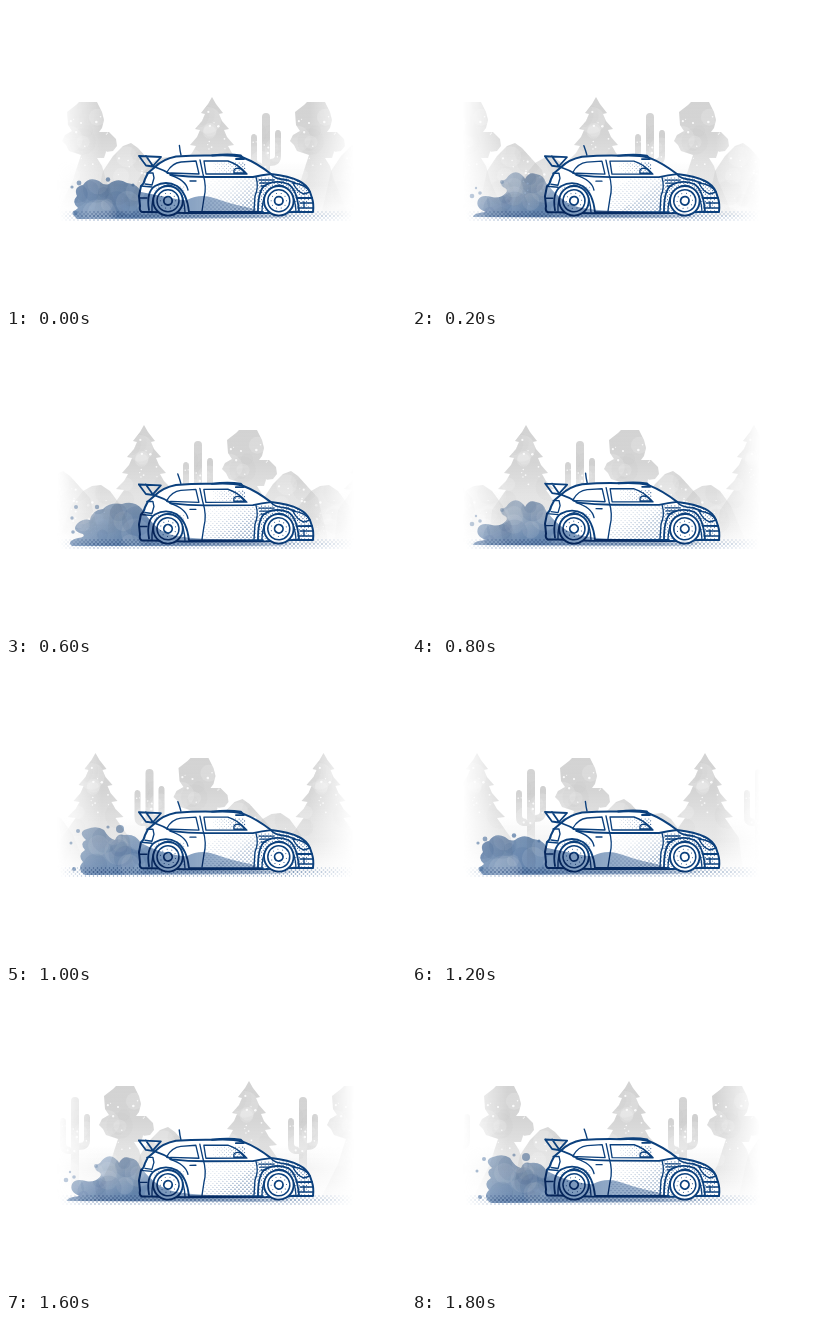
An HTML page with a canvas that plays this animation: 400 px wide and 300 px high, repeating every 1900 ms.

```html
<!DOCTYPE html>
<html lang="en">
<head>
<meta charset="utf-8">
<title>Rally car</title>
<style>
  html, body { margin: 0; width: 100%; height: 100%; overflow: hidden; background: #fff; }
  canvas { display: block; width: 400px; height: 300px; }
</style>
</head>
<body>
<canvas id="stage"></canvas>
<script>
const W = 400, H = 300, LOOP = 1900, STEP = 100, PERIOD = 228;
const INK = '#0b407d';

const dpr = window.devicePixelRatio || 1;

function prepare(canvas) {
  canvas.width = W * dpr;
  canvas.height = H * dpr;
  const c = canvas.getContext('2d');
  c.scale(dpr, dpr);
  return c;
}
const ctx = prepare(document.getElementById('stage'));
const layer = prepare(document.createElement('canvas'));

function random(seed) {
  return () => {
    seed = (seed * 16807) % 2147483647;
    return seed / 2147483647;
  };
}

function gradient(c, x0, y0, x1, y1, stops) {
  const g = c.createLinearGradient(x0, y0, x1, y1);
  stops.forEach(([at, color]) => g.addColorStop(at, color));
  return g;
}

function disc(c, x, y, r) {
  c.beginPath();
  c.arc(x, y, r, 0, Math.PI * 2);
  c.fill();
}

// Keeps what is drawn on the layer only where the mask is opaque, then prints it.
function printLayer(mask, blend = 'source-over') {
  layer.globalCompositeOperation = 'destination-in';
  layer.fillStyle = mask;
  layer.fillRect(0, 0, W, H);
  layer.globalCompositeOperation = 'source-over';
  ctx.globalCompositeOperation = blend;
  ctx.drawImage(layer.canvas, 0, 0, W, H);
  ctx.globalCompositeOperation = 'source-over';
  layer.clearRect(0, 0, W, H);
}

// ---- scenery ----
const scroll = [[0, 0], [400, 44], [800, 92], [1200, 141], [1400, 166], [1600, 191], [1800, 217], [1900, 228]];

function scrolled(t) {
  const i = scroll.findIndex(([end]) => end > t);
  const [t0, x0] = scroll[i - 1], [t1, x1] = scroll[i];
  return x0 + (x1 - x0) * (t - t0) / (t1 - t0);
}

const scenery = [
  { x: 159, left: -14, right: 14, top: 156, shape: new Path2D(
    'M-40 210L-26 172-14 157-5 152 4 151 13 157 24 172 40 210Z') },
  { x: 125, left: -14, right: 14, top: 144, shape: new Path2D(
    'M-38 210L-28 165-18 150-8 140 0 137 7 142 16 152 27 164 38 210Z') },
  { x: 206, left: -24, right: 24, top: 96, shape: new Path2D(
    'M0 91L4 98 11 107 7 108 10 115 17 123 12 124 15 131 22 139 16 140 20 147 28 155 20 156 34 176 38 210H-38L-34 176-20 156-28 155-20 147-16 140-22 139-15 131-12 124-17 123-10 115-7 108-11 107-4 98Z') },
  { x: 260, left: -13, right: 13, top: 112, shape: new Path2D(
    'M-4 210V164H-8Q-15 163-15 155V132Q-15 128-12 128T-9 132V154Q-9 157-4 157V111Q-4 107 0 107T4 111V153Q9 153 9 150V128Q9 124 12 124T15 128V150Q15 160 4 160V210Z') },
  { x: 311, left: -24, right: 22, top: 102, shape: new Path2D(
    'M-22 106L-13 99-10 96 8 96 13 106 15 114 13 122 10 126 20 126 27 133 28 140 24 145 17 146 15 152 8 152 13 160 17 174 32 210H-34L-16 174-11 158-8 149-20 145-23 139-27 135-24 129-17 125-21 119Z') }
];
const shade = alpha => `rgba(203,203,203,${alpha})`;
const grey = gradient(layer, 0, 92, 0, 213, [
  [0, shade(.85)], [.3, shade(.82)], [.5, shade(.6)], [.72, shade(.32)], [1, shade(0)]]);
const haze = gradient(layer, 0, 155, 0, 213, [[0, shade(0)], [.4, shade(.2)], [1, shade(0)]]);
const sides = gradient(ctx, 51, 0, 348, 0, [
  [0, 'transparent'], [.15, '#000'], [.85, '#000'], [1, 'transparent']]);

function drawThing(thing, x, seed) {
  const rnd = random(seed);
  const c = layer;
  const place = () => thing.left + rnd() * (thing.right - thing.left);
  c.save();
  c.translate(x, 0);
  c.fillStyle = grey;
  c.fill(thing.shape);
  c.clip(thing.shape);
  for (let i = 0; i < 9; i++) {
    c.fillStyle = i % 2 ? 'rgba(255,255,255,.16)' : 'rgba(150,150,150,.05)';
    disc(c, place(), thing.top + rnd() * 70, 5 + rnd() * 9);
  }
  c.fillStyle = 'rgba(255,255,255,.85)';
  for (let i = 0; i < 15; i++) disc(c, place(), thing.top + 8 + rnd() * 50, .5 + rnd() * .8);
  c.restore();
}

function drawScenery(shift) {
  layer.fillStyle = haze;
  layer.fillRect(50, 150, 300, 64);
  scenery.forEach((thing, i) => {
    for (let x = thing.x - shift - PERIOD; x < 390; x += PERIOD) {
      if (x > 10) drawThing(thing, x, 911 + i * 77);
    }
  });
  printLayer(sides);
}

// ---- halftone ----
function halftone(c, x0, y0, x1, y1, gap, size) {
  let row = 0;
  for (let y = y0; y < y1; y += gap / 2, row++) {
    for (let x = x0 + (row % 2) * gap / 2; x < x1; x += gap) {
      const r = size(x, y);
      if (r > .1) disc(c, x, y, r);
    }
  }
}

function drawGround(shift) {
  layer.fillStyle = '#7f9abc';
  halftone(layer, 52 - shift % 4, 206, 348, 214.5, 4, (x, y) => .95 - Math.abs(y - 210) * .06);
  printLayer(gradient(layer, 54, 0, 347, 0, [[0, 'transparent'], [.12, '#000'], [.8, '#000'], [1, 'transparent']]));
}

// ---- dust ----
const wave = 'Q150 189 165 192T181 194Q194 187 208 192T235 200Q248 202 256 207L292 209 280 212 ';
const low = 'Q148 194 160 199T205 205L292 208 280 212 ';
const dust = [
  { light: .62, shape: new Path2D('M71 213Q64 207 72 202Q65 196 71 190Q67 181 77 179Q83 170 93 175Q98 180 103 178Q112 171 121 177Q132 178 135 186' + wave + 'Z'),
    drops: [[66, 181, 1.6], [73, 177, 2.4], [102, 173.5, 2.2], [127, 179, 1.6], [69, 207, 2.5]] },
  { light: .48, shape: new Path2D('M66 212Q60 207 72 204Q80 203 77 200Q65 197 71 190Q77 184 84 186Q86 176 97 175Q104 168 116 170Q128 166 136 175' + low + 'Z'),
    drops: [[66, 184, 1.7], [70, 173, 2], [91, 173, 2.2], [67, 198, 1.8]] },
  { light: .36, shape: new Path2D('M61 211Q61 207 74 206Q63 202 66 194Q69 188 80 191Q88 193 94 187Q97 183 91 181Q86 176 94 173Q100 164 107 167Q112 170 113 173Q117 165 124 168Q132 169 134 177' + low + 'Z'),
    drops: [[60, 190, 2.3], [68, 187, 1.8], [90, 176, 2], [64, 182, 1.2]] },
  { light: .5, shape: new Path2D('M79 213Q70 207 77 200Q71 193 79 188Q73 181 80 178Q71 170 81 167Q91 163 98 168Q103 177 109 178Q112 171 118 173Q129 171 135 181' + wave + 'Z'),
    drops: [[65, 181, 1.5], [72, 169, 2], [114, 167, 4], [102, 165, 1.6], [68, 207, 2]] }
];
const dustFade = gradient(layer, 56, 0, 294, 0, [
  [0, 'rgba(0,0,0,.8)'], [.3, '#000'], [.5, 'rgba(0,0,0,.8)'], [.8, 'rgba(0,0,0,.55)'], [1, 'transparent']]);

function drawDust(step) {
  const pose = step < 4 ? step : ((step - 4) >> 1) % 4;
  const { light, shape, drops } = dust[pose];
  const rnd = random(331 + pose * 50);
  const c = layer;
  const tone = alpha => `rgba(58,101,154,${alpha})`;
  c.fillStyle = gradient(c, 88, 166, 108, 212, [[0, tone(light)], [.4, tone(light + .08)], [1, tone(.78)]]);
  c.fill(shape);
  drops.forEach(d => disc(c, ...d));
  c.save();
  c.clip(shape);
  for (let i = 0; i < 15; i++) {
    c.fillStyle = i % 2 ? 'rgba(255,255,255,.1)' : 'rgba(30,75,130,.1)';
    disc(c, 66 + rnd() * 78, 172 + rnd() * 38, 5 + rnd() * 10);
  }
  c.restore();
  printLayer(dustFade, 'multiply');
}

// ---- car ----
const body = new Path2D('M146 206H136Q133 205 134 200L133 190 135 180Q138 178 139 173L142 167 149 161Q157 153 170 150.5Q190 149 208 149.5Q226 148.5 237 151.5Q251 157 265 168Q283 170 293 175Q301 179 304 186L306 192Q308 198 307 206H287L260 207H178Z');
const bold = new Path2D([
  'M133 150L155 151 147 160M133 150L140 159.5 150 161M140 150L147 160',
  'M206 149.5Q222 147.5 235 149.5L238 153H230',
  'M149 161Q158 164 166 169Q182 171 200 171L247 171Q256 169 265 168',
  'M143 204Q140 186 149 180Q160 174 171 180Q181 187 183 206H257',
  'M252 205Q252 186 258 180Q269 173 282 178Q291 183 293 205',
  'M265 168Q268 173 281 174L289 177',
  'M292 192H306'
].join(''));
const lines = new Path2D([
  'M161 166Q166 157 175 156L190 155 193 168 165 167Q160 168 161 166Z',
  'M198 155H222Q232 158 241 168L200 168Z',
  'M228 167V164Q230 161 235 163L239 167Z',
  'M194 154L197 168Q201 181 198 192L196 205',
  'M250 171Q253 181 249 190L248 205',
  'M141 167H147L148 172 146 179 139 178',
  'M135 180L146 181M134 192H141',
  'M146 205Q145 183 162 179Q178 182 179 206',
  'M256 206Q256 183 273 179Q289 182 290 206',
  'M164 169Q180 174 182 184',
  'M253 174H268M254 177H264M255 180H260',
  'M287 177Q299 178 304 186L298 188Q291 186 287 177Z',
  'M294 197H307M292 202H307M298 196V202',
  'M184 175H190'
].join(''));
const wheels = [[162, 194.8], [272.8, 194.8]];

function drawWheel(x, y, turn) {
  const c = ctx;
  c.save();
  c.translate(x, y);
  c.rotate(turn);
  c.strokeStyle = INK;
  c.fillStyle = '#fff';
  disc(c, 0, 0, 15);
  [[14.8, 1.9], [11, 1.5], [4.2, 1.8]].forEach(([r, width]) => {
    c.lineWidth = width;
    c.beginPath();
    c.arc(0, 0, r, 0, Math.PI * 2);
    c.stroke();
  });
  c.fillStyle = INK;
  for (let i = 0; i < 10; i++) {
    const a = i * Math.PI / 5;
    disc(c, Math.cos(a) * 7.7, Math.sin(a) * 7.7, .5);
  }
  c.restore();
}

function drawCar(step) {
  const c = ctx;
  const sway = Math.sin(step * Math.PI / 2.4);
  c.save();
  c.translate(220, 205 + .25 * sway);
  c.rotate(-.003 * sway);
  c.translate(-220, -205);
  c.lineJoin = c.lineCap = 'round';
  c.fillStyle = '#fff';
  c.fill(body);

  c.save();
  c.clip(body);
  c.fillStyle = '#3f6799';
  halftone(c, 199, 173, 250, 206, 4, (x, y) => .1 + (x - 198) * .007 + (y - 172) * .01);
  halftone(c, 252, 172, 303, 206, 3.6, (x, y) => .62 - Math.abs(y - 185) * .007);
  halftone(c, 208, 157, 239, 167, 3.6, (x, y) => .2 + (x - 208) * .014);
  halftone(c, 149, 181, 178, 204, 3.6, () => .45);
  c.restore();

  c.strokeStyle = INK;
  c.lineWidth = 1.35;
  c.stroke(lines);
  c.lineWidth = 1.8;
  c.stroke(bold);
  c.lineWidth = 2;
  c.stroke(body);
  c.lineWidth = 1.4;
  c.beginPath();
  c.moveTo(175, 149);
  c.quadraticCurveTo(174, 145, 172.7 + .7 * Math.cos(step * Math.PI / 2), 139.5);
  c.stroke();
  c.restore();
  wheels.forEach(([x, y]) => drawWheel(x, y, step * .9));
}

function render(time) {
  const step = Math.floor((time % LOOP) / STEP);
  const shift = scrolled(step * STEP);
  ctx.fillStyle = '#fff';
  ctx.fillRect(0, 0, W, H);
  drawScenery(shift);
  drawGround(shift);
  drawCar(step);
  drawDust(step);
}

const start = performance.now();
function tick() {
  render(performance.now() - start);
  requestAnimationFrame(tick);
}
tick();
</script>
</body>
</html>
```
